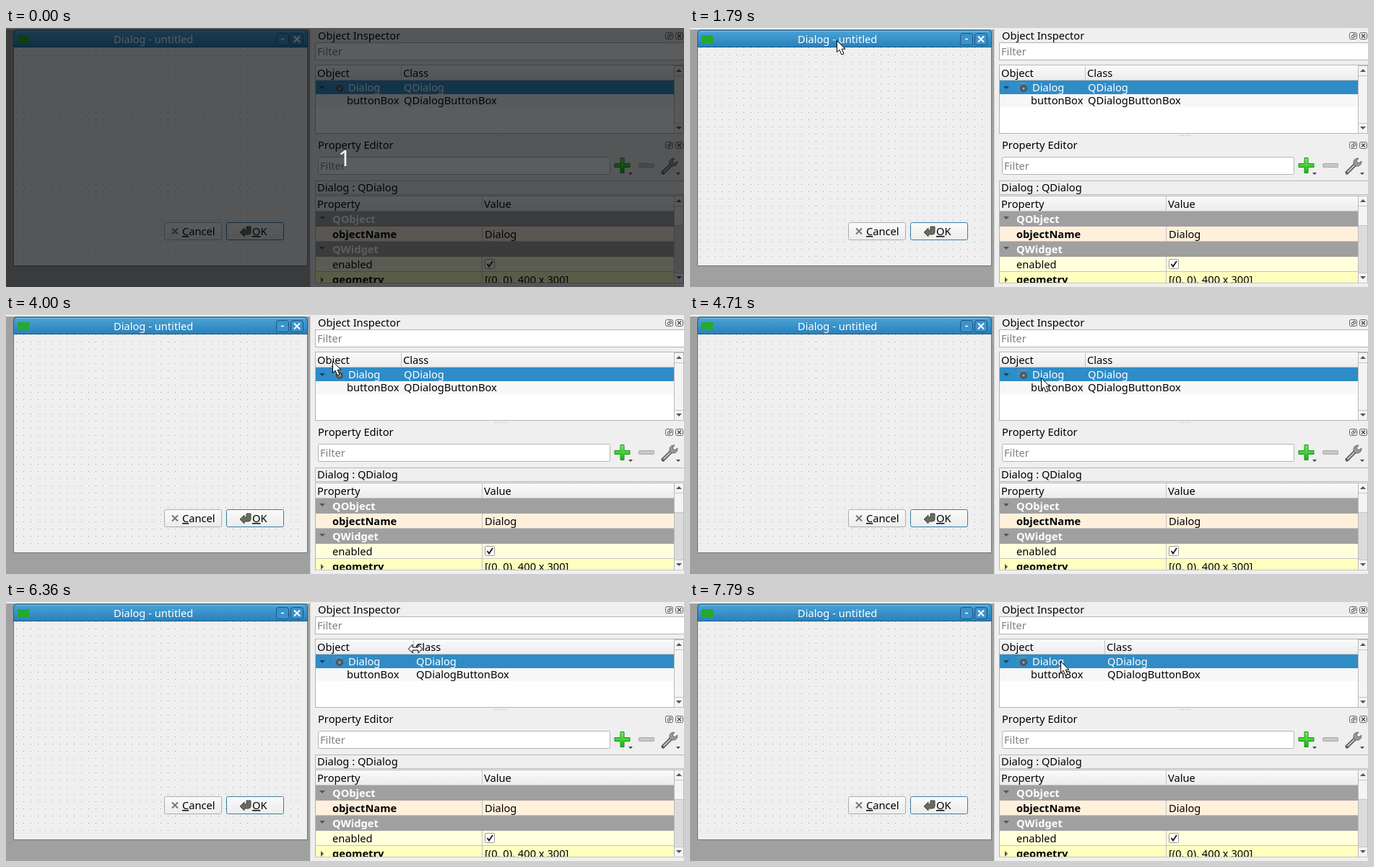
These frames come from a looping animation (939 px wide and 360 px high, 8000 ms). An HTML page:

```html
<!DOCTYPE html>
<html lang="en">
<head>
<meta charset="utf-8">
<title>Form designer</title>
<style>
html, body { margin: 0; width: 939px; height: 360px; overflow: hidden; background: #efefef; }
svg { display: block; }
text { font: 14.667px "Noto Sans", "Open Sans", sans-serif; white-space: pre; }
.b { font-weight: bold; }
.w { fill: #fff; }
.hint { fill: #808080; }
.u { text-decoration: underline; }
.box { fill: #fff; stroke: #b4b4b4; }
.line { stroke: #c4c4c4; fill: none; }
.px { shape-rendering: crispEdges; }
</style>
</head>
<body>
<svg width="939" height="360" viewBox="0 0 939 360">
  <defs>
    <linearGradient id="bar" x2="0" y2="1"><stop stop-color="#4aa5d8"/><stop offset="1" stop-color="#2a7fb9"/></linearGradient>
    <linearGradient id="head" x2="0" y2="1"><stop stop-color="#fafafa"/><stop offset="1" stop-color="#ececec"/></linearGradient>
    <linearGradient id="green" x2="0" y2="1"><stop stop-color="#7bea61"/><stop offset="1" stop-color="#12b512"/></linearGradient>
    <pattern id="grid" x="14" y="27" width="10" height="10" patternUnits="userSpaceOnUse">
      <rect width="1" height="1" fill="#a0a0a0"/>
    </pattern>
    <clipPath id="table"><path d="M428 233H939V354H428Z"/></clipPath>
    <path id="down" d="M-4 -2H4L0 2Z"/>
    <g id="dock" fill="none" stroke="#666">
      <rect x="913.5" y="6.5" width="10" height="9" rx="2"/>
      <path d="M916.5 10.5h3v3h-3zM918.5 10V8.500h3v3H920"/>
      <rect x="927.5" y="6.500" width="10" height="9" rx="2"/>
      <path d="M930 8.500l5 5m0-5l-5 5" stroke="#444" stroke-width="1.300"/>
    </g>
  </defs>

  <rect width="939" height="360" fill="#efefef"/>
  <path d="M0 2H421V360H0Z" fill="#a0a0a0"/>
  <path class="px" d="M421 0V360" stroke="#d8d8d8"/>

  <!-- Form window -->
  <path d="M10.500 330.500V7q0-4 4-4H413.500q4 0 4 4V330.500Z" fill="#efefef" stroke="#67747b"/>
  <path d="M10.500 26.500V7q0-4 4-4H413.500q4 0 4 4V26.500Z" fill="url(#bar)" stroke="#1f5f8b"/>
  <path d="M14 4.500H414" stroke="#79c0e8"/>
  <rect x="16" y="10" width="16" height="11" fill="#25a92e"/>
  <text class="w" x="149" y="21">Dialog - untitled</text>
  <g fill="#3b93cb" stroke="#19557e">
    <rect x="374.500" y="7.500" width="17" height="16" rx="3"/>
    <rect x="394.500" y="7.500" width="17" height="16" rx="3"/>
  </g>
  <path d="M381 15.500h4" stroke="#fff" stroke-width="1.500"/>
  <path d="M399 11.500l8 8m0-8l-8 8" stroke="#fff" stroke-width="2"/>
  <rect class="px" x="14" y="27" width="400" height="300" fill="url(#grid)"/>
  <rect x="219.500" y="270.500" width="79" height="24" rx="2" fill="url(#head)" stroke="#adadad"/>
  <path d="M230 278.500l8 8m0-8l-8 8" stroke="#777" stroke-width="2"/>
  <text x="244" y="288"><tspan class="u">C</tspan>ancel</text>
  <rect x="305.500" y="270.500" width="79" height="24" rx="2" fill="url(#head)" stroke="#3a7da5"/>
  <path d="M324 284l6-6v3h3v-5h6v8q0 3-4 3h-5v3z" fill="#686c5f" stroke="#44483f"/>
  <text x="341" y="288"><tspan class="u">O</tspan>K</text>

  <!-- Object inspector -->
  <text x="432" y="16">Object Inspector</text>
  <use href="#dock"/>
  <rect class="box" x="428.500" y="20.500" width="512" height="24"/>
  <text class="hint" x="431" y="38">Filter</text>
  <rect class="box" x="428.500" y="51.500" width="512" height="95"/>
  <path d="M429 53H925V72H429Z" fill="url(#head)"/>
  <path class="line" d="M429 72.500H925"/>
  <path d="M429 73H925V92H429Z" fill="#308cc6"/>
  <path d="M429 92H925V110H429Z" fill="#f7f7f7"/>
  <use href="#down" x="438" y="83" fill="#17435f"/>
  <g stroke="#7b8d98" stroke-width="1.600"><path d="M453 77h13M453 82h10M453 87h8" stroke-dasharray="2 2 9"/></g>
  <circle cx="462" cy="84" r="4" fill="#59636c" stroke="#434d56" stroke-width="2.500" stroke-dasharray="2 1"/>
  <circle cx="462" cy="84" r="1.500" fill="#a4adb5"/>
  <text x="431" y="68">Object</text>
  <text class="w" x="474" y="88">Dialog</text>
  <text x="472" y="106">buttonBox</text>
  <g id="column">
    <path class="line px" d="M547.500 53V72"/>
    <text x="550" y="68">Class</text>
    <text class="w" x="551" y="88">QDialog</text>
    <text x="551" y="106">QDialogButtonBox</text>
  </g>
  <rect x="925.500" y="52.500" width="13" height="94" fill="#f4f4f4" stroke="#bbb"/>
  <path class="line" d="M926 66.500h13M926 132.500h13"/>
  <use href="#down" transform="translate(932 59) scale(1 -1)" fill="#555"/>
  <use href="#down" x="932" y="139" fill="#555"/>
  <path d="M677 149.500h17" stroke="#aaa" stroke-dasharray="1 2"/>

  <!-- Property editor -->
  <text x="432" y="168">Property Editor</text>
  <use href="#dock" y="152"/>
  <rect class="box" x="432.500" y="179.500" width="404" height="24" rx="2"/>
  <text class="hint" x="435" y="197">Filter</text>
  <path d="M851 180.500h5v8h8v5h-8v8h-5v-8h-8v-5h8z" fill="url(#green)" stroke="#15941a"/>
  <rect x="876.500" y="188.500" width="21" height="5" rx="1" fill="#c8c8c8" stroke="#a8a8a8"/>
  <path d="M910 201l12-12" stroke="#555" stroke-width="5" stroke-linecap="round"/>
  <path d="M911 200l10-10" stroke="#c4c4c4" stroke-width="2" stroke-linecap="round"/>
  <path d="M926 181q-7 0-7 6 0 5 5 5 6 0 6-7l-4 3-3-3z" fill="#999" stroke="#666"/>
  <path d="M862 201h6l-3 3zM928 201h6l-3 3z" fill="#444"/>
  <rect x="428.500" y="212.500" width="512" height="19" fill="#efefef" stroke="#b8b8b8"/>
  <text x="431" y="227">Dialog : QDialog</text>

  <g clip-path="url(#table)">
    <rect class="box" x="428.500" y="233.500" width="512" height="122"/>
    <path d="M429 234H925V254H429Z" fill="url(#head)"/>
    <g class="px">
      <path d="M429 255H925V276H429ZM429 297H925V318H429Z" fill="#a0a0a0"/>
      <path d="M429 276H925V297H429Z" fill="#fff0dc"/>
      <path d="M429 318H925V339H429Z" fill="#ffffdc"/>
      <path d="M429 339H925V360H429Z" fill="#ffffbf"/>
      <path class="line" d="M429 254.500H925M429 296.500H925M429 338.500H925M659.500 234V254M659.500 276V296M659.500 318V354"/>
    </g>
    <g fill="#555">
      <use href="#down" x="438" y="264"/>
      <use href="#down" x="438" y="306"/>
      <use href="#down" transform="translate(438 350) rotate(-90)"/>
    </g>
    <text x="431" y="250">Property</text>
    <text x="662" y="250">Value</text>
    <text class="b w" x="452" y="271">QObject</text>
    <text class="b" x="452" y="292">objectName</text>
    <text x="663" y="292">Dialog</text>
    <text class="b w" x="452" y="313">QWidget</text>
    <text x="452" y="334">enabled</text>
    <rect x="663.500" y="321.500" width="13" height="13" rx="1" fill="#fff" stroke="#999"/>
    <path d="M666.500 328l2.500 3.500 5-7.500" fill="none" stroke="#222" stroke-width="2"/>
    <text class="b" x="452" y="355">geometry</text>
    <text x="663" y="355">[(0, 0), 400 x 300]</text>
    <rect x="925.500" y="233.500" width="13" height="121" fill="#dcdcdc" stroke="#bbb"/>
    <path d="M926 234h12v13h-12zM926 341h12v13h-12zM926 248h12v26h-12z" fill="#f4f4f4"/>
    <path class="line" d="M926 247.500h13M926 274.500h13M926 340.500h13"/>
    <use href="#down" transform="translate(932 240) scale(1 -1)" fill="#555"/>
    <use href="#down" x="932" y="347" fill="#555"/>
  </g>
  <path class="line" d="M428 354.500H939"/>

  <g id="cursor" fill="#fff" stroke="#000" stroke-linejoin="round">
    <path id="arrow" d="M.5 .5V16.500L4 13.200L7 20L10 18.800L7.200 12.200H12Z"/>
    <path id="split" d="M-9.500 0L-4 -6V-2H4V-6L9.500 0L4 6V2H-4V6Z"/>
  </g>

  <g id="intro">
    <rect width="939" height="360" fill="#020608" fill-opacity=".65"/>
    <text class="w" x="469" y="192" text-anchor="middle" style="font-size:31px">1</text>
  </g>
</svg>
<script>
const LOOP = 8000, STEP = 71, DIVIDER = 547, GRAB = 550, DRAG = 6210;
const $ = id => document.getElementById(id);
const show = (id, on) => $(id).style.display = on ? "" : "none";

// Pointer moves: start time, number of steps, points along the way
const moves = [
  [930, 10, [[103, -4], [150, 22], [188, 31], [203, 24], [204, 18]]],
  [1790, 1, [[203, 17]]],
  [3290, 6, [[207, 19], [225, 22], [262, 28], [305, 34], [345, 38], [371, 40]]],
  [3790, 12, [[378, 41], [430, 57], [490, 76], [528, 86], [531, 88], [522, 87]]],
  [4640, 4, [[507, 87], [486, 87], [476, 87], [473, 87]]],
  [5000, 4, [[481, 88], [503, 89], [518, 89], [522, 89]]],
  [5360, 8, [[518, 88], [509, 82], [525, 72], [555, 66], [567, 65], [558, 65], [550, 65]]],
  [DRAG, 7, [[550, 65], [559, 65], [567, 65], [573, 65], [575, 65], [576, 65], [577, 65]]],
  [7070, 9, [[575, 67], [560, 74], [540, 82], [523, 84], [513, 82]]]
];

function pointer(t) {
  const move = moves.findLast(m => t >= m[0]);
  if (!move) return null;
  const [start, steps, points] = move;
  const k = Math.min(steps - 1, Math.floor((t - start) / STEP + 0.05));
  const pos = k / Math.max(1, steps - 1) * (points.length - 1);
  const i = Math.floor(pos), a = points[i], b = points[i + 1] || a;
  return a.map((v, j) => Math.round(v + (b[j] - v) * (pos - i)));
}

function draw(t) {
  const at = pointer(t);
  const shift = t < DRAG ? 0 : t < 7070 ? at[0] - GRAB : 27;
  show("intro", t < 70);
  show("cursor", at);
  $("column").setAttribute("transform", `translate(${shift})`);
  if (!at) return;
  const [x, y] = at;
  const resizing = y > 52 && y < 72 && Math.abs(x - DIVIDER - shift) <= 5;
  show("arrow", !resizing);
  show("split", resizing);
  $("cursor").setAttribute("transform", `translate(${x} ${y})`);
}

const began = performance.now();
function tick() {
  draw((performance.now() - began) % LOOP);
  requestAnimationFrame(tick);
}
tick();
</script>
</body>
</html>
```
